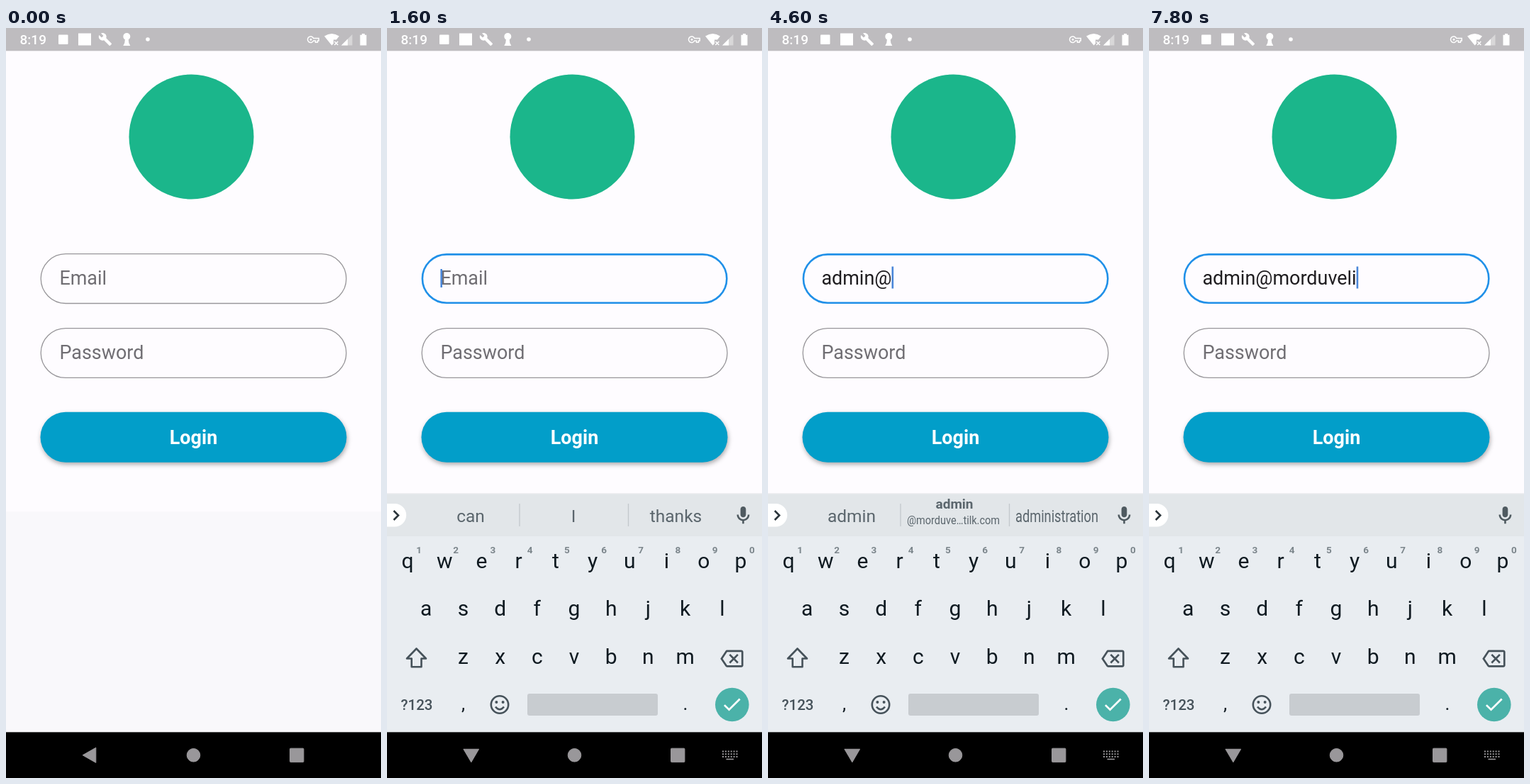
An HTML page for the animation above (8000 ms loop, 529 by 1058 pixels).

```html
<!DOCTYPE html>
<html lang="en">
<head>
<meta charset="utf-8">
<title>Login screen</title>
<style>
  html, body { margin: 0; width: 100%; height: 100%; overflow: hidden; background: #f9f8fb; }
  svg { display: block; width: 100vw; height: 100vh; font-family: Roboto, "Noto Sans", sans-serif; }
  .field { fill: none; stroke: #98969a; stroke-width: 1.3; }
  .field.focus { stroke: #2090e8; stroke-width: 2.6; x: 49.9px; y: 319.4px; width: 429.4px; height: 68.4px; rx: 34.2px; }
  .entry { font-size: 26.94px; fill: #1f1d20; }
  .hint { fill: #706e73; }
  .composing { text-decoration: underline; text-decoration-thickness: 1.5px; }
  .button { fill: #029ec9; filter: drop-shadow(1.5px 3.5px 3px rgba(0, 0, 0, .32)); }
  .key { font-size: 30px; fill: #0f1a21; text-anchor: middle; }
  .mark { font-size: 26px; }
  .digit { font-size: 13.5px; font-weight: 700; fill: #7b858b; text-anchor: middle; }
  .word { font-size: 24.5px; fill: #5b666d; text-anchor: middle; }
  .icon { fill: none; stroke: #46525a; stroke-width: 2.6; }
</style>
</head>
<body>
<svg viewBox="0 0 529 1058" preserveAspectRatio="none">
  <rect width="529" height="682.5" fill="#fefcff"/>
  <rect y="682.5" width="529" height="312" fill="#f9f8fb"/>

  <!-- status bar -->
  <rect width="529" height="32.3" fill="#bebcbf"/>
  <g fill="#fff">
    <text x="19.5" y="23.3" font-size="19" font-weight="500">8:19</text>
    <rect x="74" y="9.5" width="13.5" height="13.5" rx="1"/>
    <rect x="102" y="7.5" width="18" height="17"/>
    <path transform="translate(130 6) scale(.83)" d="M22.7 19l-9.1-9.1c.9-2.3.4-5-1.5-6.9-2-2-5-2.4-7.4-1.3L9 6 6 9 1.6 4.7C.4 7.1.9 10.1 2.9 12.1c1.9 1.9 4.6 2.4 6.9 1.5l9.1 9.1c.4.4 1 .4 1.4 0l2.3-2.3c.5-.4.5-1.1.1-1.4z"/>
    <circle cx="170.3" cy="12" r="5"/>
    <path d="M168 15h4.6l.7 6 2 4h-10l2-4z"/>
    <circle cx="200" cy="16" r="2.8"/>
    <path d="M449 11.5Q459.5 4.5 470 11.5L466 16.5H462V22L459.5 24.5z"/>
    <path d="M463.3 19l5 5m0-5l-5 5" stroke="#fff" stroke-width="1.5"/>
    <path d="M473 24.5L488.5 9V24.5z" opacity=".4"/>
    <path d="M473 24.5L482 15.5V24.5z"/>
    <path d="M502 8h4v1.8h2.5v14.7h-9V9.8h2.5z"/>
  </g>
  <g fill="none" stroke="#fff" stroke-width="1.5">
    <path d="M433.7 14.5A4.3 4.3 0 1 0 433.7 18H436.5V20.3H439.5V18H441.2V14.5z"/>
    <circle cx="430" cy="16.2" r=".8"/>
  </g>

  <!-- login form -->
  <circle cx="261.5" cy="153.5" r="88" fill="#1bb68b"/>
  <rect id="email" class="field" x="49.2" y="318.7" width="430.8" height="69.8" rx="34.9"/>
  <rect class="field" x="49.2" y="423.6" width="430.8" height="69.8" rx="34.9"/>
  <text id="hint" class="entry hint" x="75.4" y="362">Email</text>
  <text id="typed" class="entry" x="75.4" y="362"></text>
  <rect id="caret" width="2.6" fill="#4a86d8"/>
  <text class="entry hint" x="75.4" y="467">Password</text>
  <rect class="button" x="48.5" y="541.7" width="432" height="71" rx="35.5"/>
  <text x="264.5" y="587" font-size="26.94" font-weight="700" fill="#fff" text-anchor="middle">Login</text>

  <!-- keyboard -->
  <g id="keyboard">
    <rect y="656" width="529" height="2" fill="#eeeef1"/>
    <rect y="657.5" width="529" height="60" fill="#e2e6e9"/>
    <rect y="717" width="529" height="278" fill="#e9edf1"/>
    <path d="M0 671H11A16.2 16.2 0 0 1 11 703.4H0z" fill="#fff"/>
    <path d="M9.5 681l6.5 6.5-6.5 6.5" class="icon" style="stroke:#2b353b"/>
    <path transform="translate(487.1 672.4) scale(1.28)" fill="#4f5a60" d="M12 14c1.66 0 3-1.34 3-3V5c0-1.66-1.34-3-3-3S9 3.34 9 5v6c0 1.66 1.34 3 3 3zm5-3c0 2.76-2.24 5-5 5s-5-2.24-5-5H5c0 3.53 2.61 6.43 6 6.92V21h2v-3.08c3.39-.49 6-3.39 6-6.92h-2z"/>
    <g id="words">
      <path d="M187 671V703M340.5 671V703" stroke="#c3c8cc" stroke-width="1.3"/>
      <text class="word" data-x="118" data-y="697" data-max="117"></text>
      <text class="word" data-x="263" data-y="697" data-max="131"></text>
      <text class="word" data-x="263" data-y="678" data-max="131" style="font-size:19px;font-weight:700"></text>
      <text class="word" data-x="261.5" data-y="700" data-max="131" style="font-size:16px"></text>
      <text class="word" data-x="407.5" data-y="697" data-max="117"></text>
    </g>
    <g id="keys"></g>
    <g class="icon">
      <path d="M41.5 875.5L55 889.5H48.5V901.3H34.7V889.5H28z" stroke-linejoin="round"/>
      <circle cx="159" cy="954.5" r="12.2"/>
      <path d="M153 957.5Q159 965 165 957.5"/>
    </g>
    <g fill="#46525a">
      <path transform="translate(470.3 873.5) scale(1.347)" d="M22 3H7c-.69 0-1.23.35-1.59.88L0 12l5.41 8.11c.36.53.9.89 1.59.89h15c1.1 0 2-.9 2-2V5c0-1.1-.9-2-2-2zm0 16H7.07L2.4 12l4.66-7H22v14zm-11.59-2L14 13.41 17.59 17 19 15.59 15.41 12 19 8.41 17.59 7 14 10.59 10.41 7 9 8.41 12.59 12 9 15.59z"/>
      <circle cx="154.4" cy="951.1" r="2"/>
      <circle cx="163.6" cy="951.1" r="2"/>
      <text x="42" y="962" font-size="20.5" font-weight="500" text-anchor="middle">?123</text>
    </g>
    <rect x="198" y="939" width="184" height="31" rx="3" fill="#c8ccd0"/>
    <circle cx="486.8" cy="954.5" r="23.8" fill="#4bb2a9"/>
    <path transform="translate(470.4 938) scale(1.347)" fill="#fff" d="M9 16.17L4.83 12l-1.42 1.41L9 19 21 7l-1.41-1.41z"/>
  </g>

  <!-- navigation bar -->
  <rect y="993.35" width="529" height="65" fill="#000"/>
  <g fill="#99979a" stroke="#99979a" stroke-linejoin="round">
    <path id="back" d="M108.2 1025.8L126.8 1015.2V1036.4z"/>
    <circle cx="264.5" cy="1025.8" r="9.3"/>
    <rect x="400.5" y="1016.2" width="19.4" height="19.4" rx="1"/>
    <g id="navOpen">
      <path d="M107.9 1017.3H129.6L118.8 1035.8z"/>
      <path d="M473 1020.5H495M473 1024.3H495M473 1028H495" stroke-width="2" stroke-dasharray="2 1.9"/>
      <path d="M478.5 1031.5H489" stroke-width="1.6"/>
    </g>
  </g>
</svg>
<script>
const LOOP = 8000, STEP = 200, TAP = 1400, OPEN = 1600;
const LEFT = 75.4, PITCH = 52.2;
const EMAIL = "admin@morduveli";
const KEY_TIMES = [2600, 2800, 3000, 3400, 3600, 4600, 5400, 5800, 6200, 6400, 6600, 7000, 7200, 7400, 7800];
const DOMAIN = "@morduve…tilk.com";

// start time, then left word, middle word, contact name, contact domain, right word
const SUGGESTIONS = [
  [0, "can", "I", "", "", "thanks"],
  [2800, "ad", "", "admin", DOMAIN, "address"],
  [3400, "admin", "", "admin", DOMAIN, "administration"],
  [4800]
];

const $ = id => document.getElementById(id);
const show = (el, on) => el.setAttribute("visibility", on ? "inherit" : "hidden");

function addText(cls, x, y, label) {
  const el = document.createElementNS("http://www.w3.org/2000/svg", "text");
  el.setAttribute("class", cls);
  el.setAttribute("x", x);
  el.setAttribute("y", y);
  el.textContent = label;
  $("keys").append(el);
}

// Every row is centred on the same line.
["qwertyuiop", "asdfghjkl", "zxcvbnm"].forEach((row, r) => {
  const start = 264 - (row.length - 1) / 2 * PITCH;
  [...row].forEach((c, i) => addText("key", start + i * PITCH, 761.6 + r * 67.7, c));
});
[..."1234567890"].forEach((d, i) => addText("digit", 45 + i * PITCH, 740.5, d));
addText("key mark", 107.5, 962, ",");
addText("key mark", 421, 962, ".");

// Long suggestions are condensed to their slot, as the keyboard does.
function setWord(el, label = "") {
  el.textContent = label;
  const { x, y, max } = el.dataset;
  const squeeze = label ? Math.min(1, max / el.getComputedTextLength()) : 1;
  el.setAttribute("transform", `translate(${x} ${y}) scale(${squeeze} 1)`);
}

function draw(t) {
  const count = KEY_TIMES.filter(k => k <= t).length;
  const lastKey = count ? KEY_TIMES[count - 1] : TAP;
  const typed = $("typed"), caret = $("caret");

  typed.textContent = EMAIL.slice(0, count);
  typed.classList.toggle("composing", count < 6);
  show($("hint"), !count);
  $("email").classList.toggle("focus", t >= OPEN);

  show(caret, t >= TAP && (t - lastKey) % 1000 < 500);
  caret.setAttribute("x", LEFT + (count ? typed.getComputedTextLength() : 0));
  caret.setAttribute("y", count ? 336.5 : 340);
  caret.setAttribute("height", count ? 31 : 26);

  show($("keyboard"), t >= OPEN);
  show($("back"), t < TAP);
  show($("navOpen"), t >= TAP);

  const [, ...words] = SUGGESTIONS.filter(s => s[0] <= t).pop();
  show($("words"), words.length);
  $("words").querySelectorAll("text").forEach((el, i) => setWord(el, words[i]));
}

let shown = -1;
const begin = performance.now();
function tick() {
  const t = Math.floor((performance.now() - begin) % LOOP / STEP) * STEP;
  if (t !== shown) draw(shown = t);
  requestAnimationFrame(tick);
}
tick();
</script>
</body>
</html>
```
